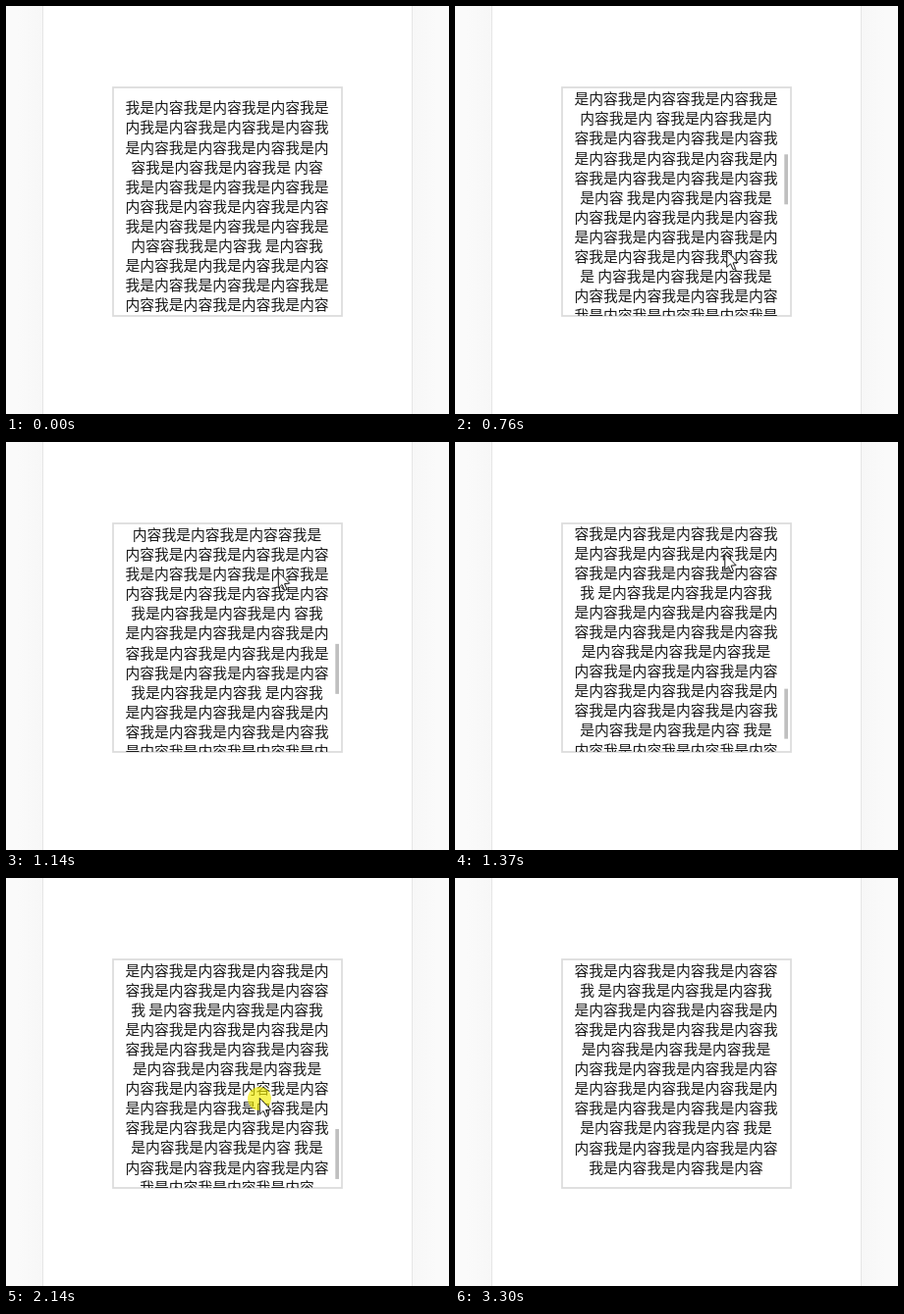
Recreate the animation shown at these times as an HTML page with a canvas. Size 451x416 px, loop 3.45 s.

```html
<!DOCTYPE html>
<html lang="zh">
<head>
<meta charset="utf-8">
<style>
html, body { margin: 0; width: 100%; height: 100%; overflow: hidden; background: #fafafa; }
canvas { display: block; }
</style>
</head>
<body>
<canvas id="stage" width="451" height="416"></canvas>
<script>
const ctx = document.getElementById('stage').getContext('2d');
const LOOP = 3450, TICK = 76.75, LAST = 43;
const BOTTOM = 772;

const lines = `我是内容我是内容我是内容我是
内我是内容我是内容我是内容我
是内容我是内容我是内容我是内
容我是内容我是内容我是 内容
我是内容我是内容我是内容我是
内容我是内容我是内容我是内容
我是内容我是内容我是内容我是
内容容我我是内容我 是内容我
是内容我是内我是内容我是内容
我是内容我是内容我是内容我是
内容我是内容我是内容我是内容
我是内容我是内 容我是内容我
是内容我是内容我是内容我是内
容我是内容我是内容我是内容我
是内容我是内容容我是内容我是
内容我是内 容我是内容我是内
容我是内容我是内容我是内容我
是内容我是内容我是内容我是内
容我是内容我是内容我是内容我
是内容 我是内容我是内容我是
内容我是内容我是内我是内容我
是内容我是内容我是内容我是内
容我是内容我是内容我是内容我
是 内容我是内容我是内容我是
内容我是内容我是内容我是内容
我是内容我是内容我是内容我是
内容我是内容我是内容容我是
内容我是内容我是内容我是内容
我是内容我是内容我是内容我是
内容我是内容我是内容我是内容
我是内容我是内容我是内 容我
是内容我是内容我是内容我是内
容我是内容我是内容我是内我是
内容我是内容我是内容我是内容
我是内容我是内容我 是内容我
是内容我是内容我是内容我是内
容我是内容我是内容我是内容我
是内容我是内容我是内容我是内
容我是内容我是内容我是内容容
我 是内容我是内容我是内容我
是内容我是内容我是内容我是内
容我是内容我是内容我是内容我
是内容我是内容我是内容我是
内容我是内容我是内容我是内容
是内容我是内容我是内容我是内
容我是内容我是内容我是内容我
是内容我是内容我是内容 我是
内容我是内容我是内容我是内容
我是内容我是内容我是内容`.split('\n');

// Pointer and scroll at the start and end of each drag; the list coasts in between.
const poses = [
  { k: 1, x: 269, y: 306, scroll: 0 },
  { k: 4, x: 272, y: 265, scroll: 0, drag: true },
  { k: 7, x: 274, y: 159, scroll: 106 },
  { k: 12.2, x: 277, y: 269, scroll: 330, drag: true },
  { k: 15, x: 277, y: 132, scroll: 531 },
  { k: 20, x: 274, y: 110, scroll: BOTTOM },
  { k: 24, x: 274, y: 110, scroll: BOTTOM, drag: true },
  { k: 28, x: 258, y: 224, scroll: BOTTOM - 20, drag: true },
  { k: 29, x: 259, y: 204, scroll: BOTTOM },
  { k: 35, x: 279, y: 89, scroll: BOTTOM },
  { k: 42, x: 403, y: 401, scroll: BOTTOM }
];

const clamp = v => Math.max(0, Math.min(1, v));
const easeOut = p => 1 - (1 - p) ** 2;
const mix = (a, b, p) => a + (b - a) * p;

function poseAt(k) {
  const n = Math.max(0, poses.findLastIndex(p => p.k <= k));
  const a = poses[n], b = poses[n + 1] || a;
  const p = a === b ? 0 : clamp((k - a.k) / (b.k - a.k));
  const e = a.drag ? p : easeOut(p);
  return {
    x: mix(a.x, b.x, e),
    y: mix(a.y, b.y, e),
    scroll: Math.round(mix(a.scroll, b.scroll, e)),
    down: a.drag && k >= a.k
  };
}

// The bar stays for a moment after scrolling stops, then fades.
function barAlpha(k) {
  let idle = Infinity;
  poses.forEach((b, i) => {
    const a = poses[i - 1];
    if (a && a.scroll !== b.scroll && k > a.k) idle = Math.max(0, k - b.k);
  });
  return clamp((4.25 - idle) / 2.5);
}

function rect(x, y, w, h, fill) {
  ctx.fillStyle = fill;
  ctx.fillRect(x, y, w, h);
}

function shade(from, to) {
  const g = ctx.createLinearGradient(from, 0, to, 0);
  g.addColorStop(0, '#f7f7f7');
  g.addColorStop(1, '#fafafa');
  rect(Math.min(from, to), 0, Math.abs(to - from), 416, g);
}

function drawPage() {
  rect(0, 0, 451, 416, '#fafafa');
  shade(37, 12);
  shade(414, 439);
  rect(37, 0, 377, 416, '#e6e6e6');
  rect(38, 0, 375, 416, '#fff');
  ctx.strokeStyle = '#ddd';
  ctx.lineWidth = 1.8;
  ctx.strokeRect(109, 83, 233, 233);
}

function drawText(scroll) {
  ctx.save();
  ctx.beginPath();
  ctx.rect(110, 84, 231, 232);
  ctx.clip();
  ctx.font = '14.8px "Noto Sans CJK SC", "Noto Sans CJK", sans-serif';
  ctx.textAlign = 'center';
  ctx.fillStyle = '#1a1a1a';
  lines.forEach((line, i) => {
    // Rows are 20 px apart, with one extra pixel every 15 rows.
    const y = 109 + i * 20 + Math.floor((i + 13) / 15) - scroll;
    if (y > 75 && y < 335) ctx.fillText(line, 225, y);
  });
  ctx.restore();
}

function drawBar(scroll, alpha) {
  ctx.globalAlpha = alpha;
  rect(335.3, 85.6 + scroll * 0.2265, 3.7, 51, '#bfbfbf');
  ctx.globalAlpha = 1;
}

function drawMouse({ x, y, down }) {
  if (down) {
    ctx.globalAlpha = 0.65;
    ctx.fillStyle = '#f3ed00';
    ctx.beginPath();
    ctx.arc(x, y + 1, 12, 0, Math.PI * 2);
    ctx.fill();
    ctx.globalAlpha = 1;
  }
  ctx.save();
  ctx.translate(x + 0.3, y + 0.5);
  ctx.scale(1.1, 1.1);
  ctx.beginPath();
  [[0, 0], [0, 15], [3.4, 11.8], [5.8, 17.2], [8, 16.2], [5.7, 11], [10.3, 10.6]]
    .forEach(p => ctx.lineTo(...p));
  ctx.closePath();
  ctx.fillStyle = '#fff';
  ctx.fill();
  ctx.strokeStyle = '#111';
  ctx.lineWidth = 0.9;
  ctx.stroke();
  ctx.restore();
}

const start = performance.now();

function frame() {
  const t = (performance.now() - start) % LOOP;
  const k = Math.min(LAST, Math.floor((t + 14) / TICK));
  const pose = poseAt(k);
  drawPage();
  drawText(pose.scroll);
  drawBar(pose.scroll, barAlpha(k));
  if (k > 0 && k < LAST) drawMouse(pose);
  requestAnimationFrame(frame);
}
frame();
</script>
</body>
</html>
```
